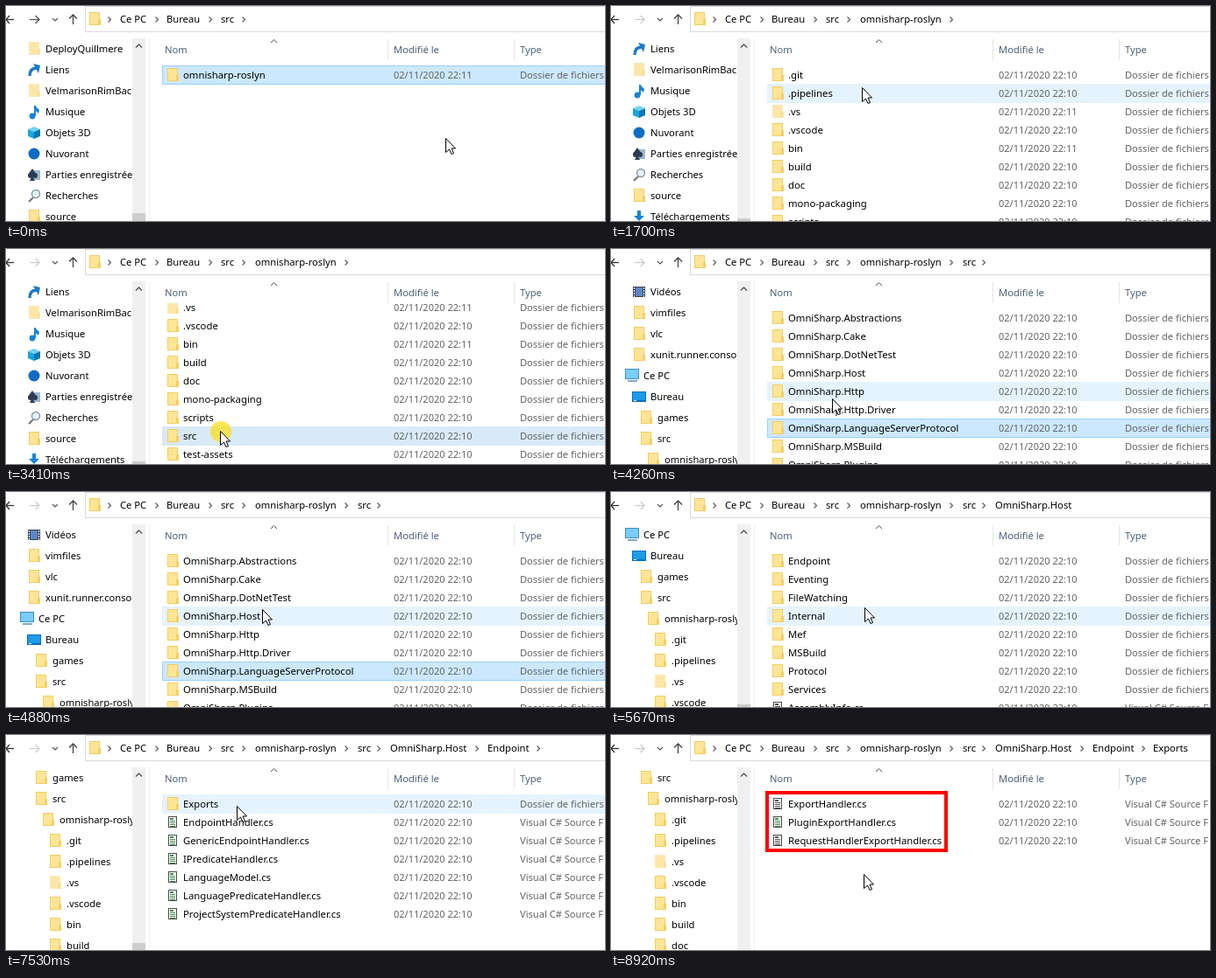
An HTML page with a canvas for the animation above (9.14 s loop, 683 by 246 pixels).

```html
<!DOCTYPE html>
<html lang="fr">
<head>
<meta charset="utf-8">
<title>Explorateur</title>
<style>
html, body { margin: 0; width: 100%; height: 100%; overflow: hidden; background: #fff; }
canvas { display: block; width: 683px; height: 246px; }
</style>
</head>
<body>
<canvas id="stage" width="683" height="246"></canvas>
<script>
const W = 683, H = 246, LOOP = 9140, ROW = 21, LIST_Y = 68, SIDE_ROW = 24;
const g = document.getElementById('stage').getContext('2d');
const FAMILY = '"Noto Sans", "Open Sans", sans-serif';
const GREY = '#636363', HEAD = '#4c607a';

// Address bar
const crumbs = ['Ce PC', 'Bureau', 'src', 'omnisharp-roslyn', 'src', 'OmniSharp.Host', 'Endpoint', 'Exports'];
const crumbX = [130, 183, 245, 284, 401, 438, 549, 618];
const chevronX = [171, 232, 270, 387, 424, 536, 606];

// Sidebar: label, text x, icon
const side = [
  ['DeployQuillmere', 45, 'faded'], ['Liens', 45, 'link'], ['VelmarisonRimBackups', 45, 'faded'],
  ['Musique', 45, 'music'], ['Objets 3D', 45, 'cube'], ['Nuvorant', 45, 'dot'],
  ['Parties enregistrées', 45, 'games'], ['Recherches', 45, 'search'], ['source', 45, 'folder'],
  ['Téléchargements', 45, 'download'], ['Vidéos', 45, 'film'], ['vimfiles', 45, 'folder'],
  ['vlc', 45, 'folder'], ['xunit.runner.console', 45, 'folder'], ['Ce PC', 37, 'pc'],
  ['Bureau', 45, 'desktop'], ['games', 53, 'folder'], ['src', 53, 'folder'],
  ['omnisharp-roslyn', 61, 'folder'], ['.git', 69, 'folder'], ['.pipelines', 69, 'folder'],
  ['.vs', 69, 'faded'], ['.vscode', 69, 'folder'], ['bin', 69, 'folder'],
  ['build', 69, 'folder'], ['doc', 69, 'folder']
];

// Each view: start of navigation, crumb count, late chevron, sidebar offset, scroll thumb y, entries
const views = [
  { at: 0, depth: 3, chevron: 0, top: 0, thumb: 237, names: 'omnisharp-roslyn' },
  { at: 1140, depth: 4, chevron: 1530, top: 1, thumb: 243,
    names: '.git .pipelines .vs .vscode bin build doc mono-packaging scripts src test-assets' },
  { at: 3490, depth: 5, chevron: 3900, top: 10, thumb: H,
    names: 'Abstractions Cake DotNetTest Host Http Http.Driver LanguageServerProtocol MSBuild Plugins', prefix: 'OmniSharp.' },
  { at: 5500, depth: 6, chevron: 5900, top: 14, thumb: 243,
    names: 'Endpoint Eventing FileWatching Internal Mef MSBuild Protocol Services AssemblyInfo.cs' },
  { at: 6670, depth: 7, chevron: 7140, top: 16, thumb: 238,
    names: 'Exports EndpointHandler.cs GenericEndpointHandler.cs IPredicateHandler.cs LanguageModel.cs LanguagePredicateHandler.cs ProjectSystemPredicateHandler.cs' },
  { at: 7750, depth: 8, chevron: Infinity, top: 17, thumb: H,
    names: 'ExportHandler.cs PluginExportHandler.cs RequestHandlerExportHandler.cs' }
];
views.forEach(v => { v.items = v.names.split(' ').map(n => (v.prefix || '') + n); });
const recent = ['omnisharp-roslyn', '.vs', 'bin'];

const path = [
  [210, 502, 152], [1000, 290, 80], [1620, 290, 80], [1700, 287, 94], [1780, 286, 98],
  [2020, 286, 98], [2320, 258, 183], [2480, 257, 182], [2800, 257, 182], [3250, 245, 209],
  [4120, 245, 209], [4520, 272, 79], [4880, 293, 135], [5060, 293, 135], [5240, 293, 139],
  [5580, 293, 139], [6000, 267, 86], [6440, 267, 86], [6600, 264, 82], [8540, 264, 82], [8920, 289, 160]
];
const clicks = [[920, 1140], [3330, 3490], [3720, 3900], [5270, 5450], [6510, 6670], [7600, 7750]];

function cursorAt(t) {
  const i = path.findIndex(p => p[0] > t);
  if (i === 0) return path[0].slice(1);
  if (i < 0) return path[path.length - 1].slice(1);
  const [t0, x0, y0] = path[i - 1], [t1, x1, y1] = path[i];
  let k = (t - t0) / (t1 - t0);
  if (t1 - t0 > 200) k = k * k * (3 - 2 * k);
  return [Math.round(x0 + (x1 - x0) * k), Math.round(y0 + (y1 - y0) * k)];
}

function rect(x, y, w, h, color) {
  g.fillStyle = color;
  g.fillRect(x, y, w, h);
}

function label(s, x, y, color = '#000', size = 11.2) {
  g.font = size + 'px ' + FAMILY;
  g.fillStyle = color;
  g.fillText(s, x, y);
}

function line(points, color, width = 1) {
  g.beginPath();
  for (let i = 0; i < points.length; i += 2) g.lineTo(points[i], points[i + 1]);
  g.strokeStyle = color;
  g.lineWidth = width;
  g.stroke();
}

function shape(points, color) {
  g.beginPath();
  for (let i = 0; i < points.length; i += 2) g.lineTo(points[i], points[i + 1]);
  g.closePath();
  g.fillStyle = color;
  g.fill();
}

function disc(x, y, r, color) {
  g.beginPath();
  g.arc(x, y, r, 0, Math.PI * 2);
  g.fillStyle = color;
  g.fill();
}

function clipped(x, y, w, h, draw) {
  g.save();
  g.beginPath();
  g.rect(x, y, w, h);
  g.clip();
  draw();
  g.restore();
}

function folder(x, y, faded) {
  g.globalAlpha = faded ? 0.45 : 1;
  rect(x, y, 12, 15, '#f3cd62');
  rect(x + 1, y + 1, 10, 13, '#ffe596');
  rect(x + 10, y + 8, 3, 7, '#f6cf62');
  g.globalAlpha = 1;
}

function page(x, y, ink) {
  rect(x, y, 10, 13, '#4a4a4a');
  rect(x + 1, y + 1, 8, 11, '#fff');
  rect(x + 2, y + 2, 4, 2, ink);
  for (let i = 5; i < 12; i += 2) rect(x + 2, y + i, 6, 1, ink);
}

// Icons are drawn around the origin
const icons = {
  link() {
    g.beginPath();
    g.moveTo(-5, 7);
    g.quadraticCurveTo(-5, -2, 3, -2);
    g.strokeStyle = '#1c78c8';
    g.lineWidth = 3.4;
    g.stroke();
    shape([-1, -7, 7, -5, 5, 4], '#1c78c8');
  },
  music() {
    rect(0, -7, 2, 12, '#1683d8');
    shape([1, -7, 6, -2, 5, 2, 1, -2], '#1683d8');
    disc(-2, 5, 3.4, '#1683d8');
  },
  cube() {
    shape([0, -7, 7, -4, 0, -1, -7, -4], '#6fd3f2');
    shape([-7, -4, 0, -1, 0, 7, -7, 4], '#1ba5d8');
    shape([7, -4, 0, -1, 0, 7, 7, 4], '#0b78b8');
  },
  dot() { disc(0, 0, 6.5, '#0f6cc4'); },
  games() {
    rect(0, -5, 7, 11, '#9ab8d2');
    shape([-2, -7, 3, 0, -2, 2, -7, 0], '#2d3b52');
    disc(-4, 1, 3, '#2d3b52');
    disc(1, 1, 3, '#2d3b52');
    shape([-2, 1, 1, 7, -5, 7], '#2d3b52');
  },
  search() {
    line([-1, 2, -6, 7], '#777', 2.2);
    disc(2, -2, 5.2, '#8a97a3');
    disc(2, -2, 3.8, '#e4f2fb');
  },
  download() {
    rect(-2, -7, 4, 7, '#1683d8');
    shape([-6, -1, 6, -1, 0, 5], '#1683d8');
    rect(-6, 6, 12, 1.5, '#1683d8');
  },
  film() {
    rect(-7, -6, 14, 12, '#3c4650');
    rect(-4, -5, 8, 10, '#5e86c6');
    for (let y = -5; y < 6; y += 3) {
      rect(-6, y, 1, 2, '#fff');
      rect(5, y, 1, 2, '#fff');
    }
  },
  pc() {
    rect(-8, -8, 16, 12, '#3d8fc8');
    rect(-7, -7, 14, 10, '#7accf8');
    rect(-5, 5, 11, 2, '#7fa9c4');
  },
  desktop() {
    rect(-8, -6, 16, 12, '#0a6fc2');
    rect(-7, -5, 14, 9, '#1e9be8');
    rect(-6, 4, 3, 1, '#fff');
  }
};

function chevron(x) {
  line([x - .5, 12.5, x + 2.5, 15.5, x - .5, 18.5], '#555', 1.1);
}

function drawAddress(view, t) {
  const forward = view.at ? '#ccc' : '#555';
  line([0, 15.5, 9, 15.5], '#333', 1.3);
  line([4, 11, 0, 15.5, 4, 20], '#333', 1.3);
  line([27, 15.5, 38, 15.5], forward, 1.3);
  line([33.5, 11, 38, 15.5, 33.5, 20], forward, 1.3);
  line([53, 14, 56, 17, 59, 14], '#555', 1.2);
  line([76.5, 21, 76.5, 10], '#444', 1.3);
  line([72, 14.5, 76.5, 10, 81, 14.5], '#444', 1.3);
  g.strokeStyle = '#d9d9d9';
  g.lineWidth = 1;
  g.strokeRect(90.5, .5, W, 29);
  folder(95, 7);
  chevron(117);
  for (let i = 0; i < view.depth; i++) {
    label(crumbs[i], crumbX[i], 19);
    if (i < view.depth - 1 || t >= view.chevron) chevron(chevronX[i]);
  }
}

function drawSide({ top, thumb }) {
  clipped(0, 37, 144, H - 37, () => {
    for (let i = top; i < Math.min(side.length, top + 9); i++) {
      const [name, x, kind] = side[i], y = 49 + (i - top) * SIDE_ROW;
      if (icons[kind]) {
        g.save();
        g.translate(x - 13, y);
        icons[kind]();
        g.restore();
      } else {
        folder(x - 19, y - 8, kind === 'faded');
      }
      label(name, x, y + 4);
    }
  });
  rect(144, 37, 15, H - 37, '#f0f0f0');
  line([148, 47.5, 151.5, 44, 155, 47.5], '#555', 1.4);
  rect(144, thumb, 15, H, '#cdcdcd');
  rect(163, 37, 1, H - 37, '#f0f0f0');
}

function drawHeader() {
  label('Nom', 181, 54, HEAD);
  label('Modifié le', 442, 54, HEAD);
  label('Type', 586, 54, HEAD);
  rect(435, 38, 1, 24, '#e5e5e5');
  rect(579, 38, 1, 24, '#e5e5e5');
  line([302, 42, 305.5, 38.5, 309, 42], '#555');
}

function drawList(index, t, cy, pressed) {
  const view = views[index];
  const scroll = index === 1 && t >= 2720 ? 54 : 0;
  const selected = index === 0 ? 0 : index === 2 && t >= 3800 ? 6 : -1;
  const hover = Math.floor((cy - LIST_Y + scroll) / ROW);
  clipped(164, 62, W - 164, H - 62, () => {
    view.items.forEach((name, i) => {
      const y = LIST_Y + i * ROW - scroll, base = y + 15;
      const file = name.endsWith('.cs');
      if (i === selected) {
        rect(178, y, W, ROW + 1, '#99d1ff');
        rect(179, y + 1, W, ROW - 1, '#cce8ff');
      } else if (i === hover) {
        rect(178, y, W, ROW + 1, pressed ? '#d8eaf8' : '#e5f3ff');
      }
      if (file) page(185, y + 4, index === 4 || i === 1 ? '#3f8a4a' : '#555');
      else folder(184, y + 3, name === '.vs');
      label(name, 202, base, '#000', 11.3);
      label('02/11/2020 22:1' + (recent.includes(name) ? 1 : 0), 442, base, GREY, 11);
      label(file ? 'Visual C# Source F' : 'Dossier de fichiers', 586, base, GREY, 11.1);
    });
  });
}

function drawTip() {
  rect(271, 112, 196, 50, 'rgba(0,0,0,.14)');
  rect(270, 111, 196, 49, 'rgba(0,0,0,.3)');
  rect(268, 109, 196, 49, '#767676');
  rect(269, 110, 194, 47, '#fff');
  ['Date de création : 02/11/2020 22:10', 'Taille : 322 octet(s)', 'Fichiers : NullEventEmitter.cs']
    .forEach((s, i) => label(s, 274, 123 + i * 15, '#505050', 11.1));
}

function drawCursor(x, y) {
  const arrow = [0, 0, 0, 16, 4, 12.5, 6.5, 18, 9, 17, 6.5, 11.5, 11, 11.5];
  const points = arrow.map((v, i) => v - .5 + (i % 2 ? y : x));
  shape(points, '#fff');
  line(points.concat(points.slice(0, 2)), '#000');
}

function draw(t) {
  let index = views.length - 1;
  while (views[index].at > t) index--;
  const view = views[index], age = t - view.at;
  const [cx, cy] = cursorAt(t);
  const pressed = clicks.some(([a, b]) => t >= a && t < b);

  rect(0, 0, W, H, '#fff');
  drawAddress(view, t);
  drawSide(index && age < 160 ? views[index - 1] : view);
  drawHeader();
  if (!index || age >= 80) drawList(index, t, cy, pressed);
  if (t >= 6300 && t < 6510) drawTip();
  if (index === 5 && age >= 80) {
    g.strokeStyle = '#f00';
    g.lineWidth = 4;
    g.strokeRect(178, 66, 204, 66);
  }
  if (pressed) disc(cx, cy, 12, 'rgba(255,220,20,.72)');
  drawCursor(cx, cy);
}

const start = performance.now();
function tick() {
  draw((performance.now() - start) % LOOP);
  requestAnimationFrame(tick);
}
tick();
</script>
</body>
</html>
```
